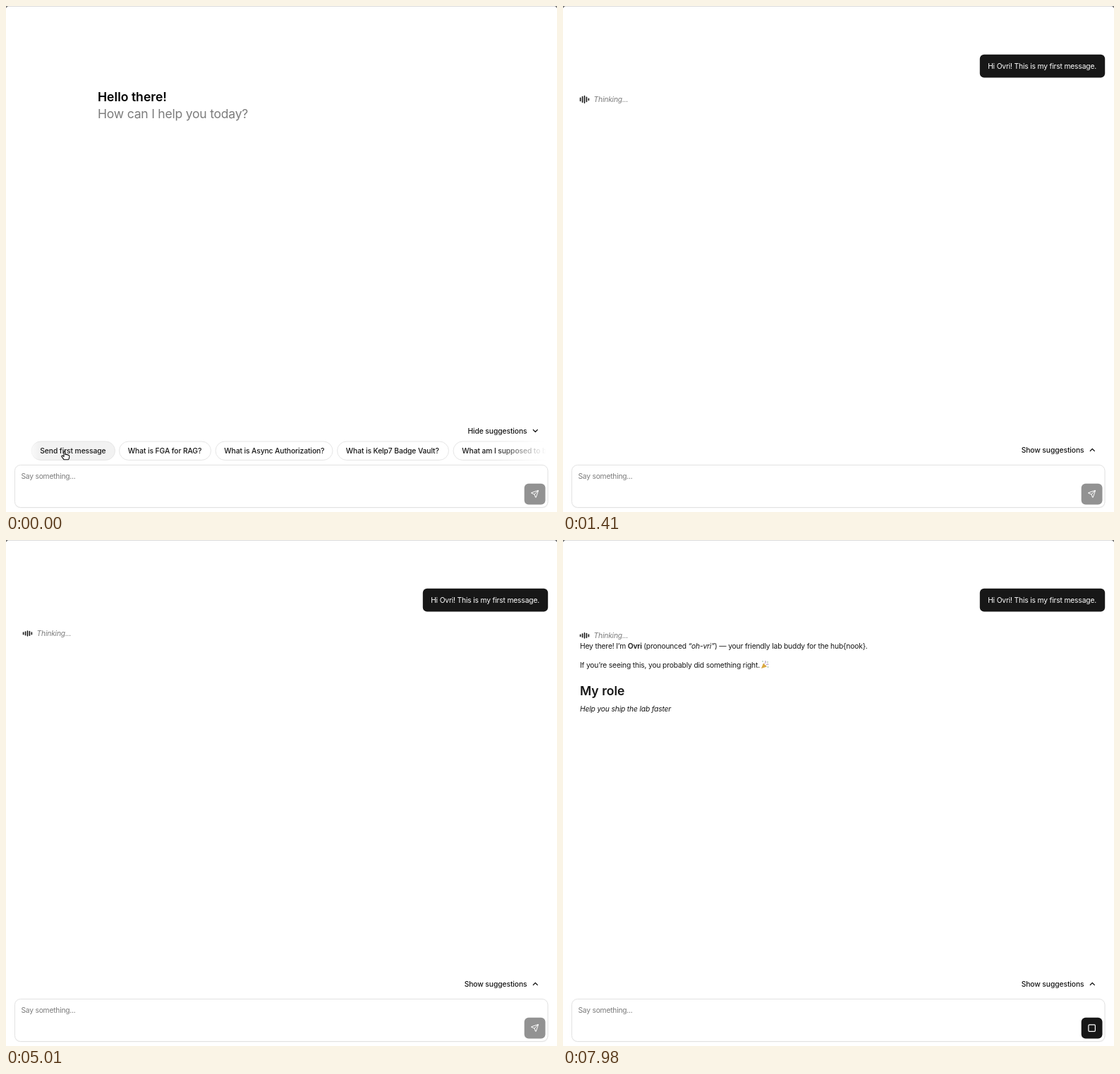
Write an HTML page that moves like this. It is 781 px wide and 717 px high and loops after 8 s.

```html
<!DOCTYPE html>
<html lang="en">
<head>
<meta charset="utf-8">
<title>Chat</title>
<style>
  html, body { margin: 0; width: 100%; height: 100%; overflow: hidden; background: #fff; }
  svg { display: block; }
  text { font: 10.3px Inter, sans-serif; letter-spacing: -.017em; fill: #171717; white-space: pre; }
  .medium { font-weight: 500; letter-spacing: -.009em; }
  .title { font-size: 17.6px; letter-spacing: 0; font-weight: 600; }
  .subtitle { font-size: 17.6px; letter-spacing: -.014em; }
  .muted { fill: #7c7c7c; }
  .italic { font-style: italic; }
  .bold { font-weight: 600; }
  .line { fill: none; stroke-linecap: round; stroke-linejoin: round; }
</style>
</head>
<body>
<svg width="781" height="717" viewBox="0 0 781 717">
  <defs>
    <linearGradient id="fade" gradientUnits="userSpaceOnUse" x1="28" x2="766">
      <stop offset="0" stop-color="#fff" stop-opacity="0"/>
      <stop offset=".025" stop-color="#fff"/>
      <stop offset=".9" stop-color="#fff"/>
      <stop offset="1" stop-color="#fff" stop-opacity="0"/>
    </linearGradient>
    <mask id="edges" maskUnits="userSpaceOnUse" x="0" y="600" width="781" height="44.5">
      <rect x="24" y="600" width="742" height="44.5" fill="url(#fade)"/>
    </mask>
  </defs>

  <path d="M0 .5H781" stroke="#dcdcdc"/>
  <path d="M0 0H3L0 3ZM781 0H778L781 3Z" fill="#777"/>

  <g id="welcome">
    <text class="title" x="130" y="134.5" style="fill:#000">Hello there!</text>
    <text class="subtitle muted" x="130" y="158.5">How can I help you today?</text>
  </g>

  <g id="chat">
    <rect x="590.8" y="68.8" width="177.4" height="32.6" rx="6" fill="#171717"/>
    <text x="756" y="88.8" text-anchor="end" style="fill:#fff">Hi Ovri! This is my first message.</text>
    <g id="thinking">
      <path id="bars" class="line" stroke="#171717" stroke-width="1.6"/>
      <text class="italic muted" x="43.5" y="136.2">Thinking...</text>
    </g>
    <g id="reply"></g>
    <g id="popper">
      <path d="M281 182L284 174.5L289 179.5Z" fill="#d9a93f"/>
      <path class="line" d="M286 175Q288 174 287 171.5M288 177Q289 175 291 176" stroke="#9b7bb0"/>
      <path class="line" d="M283 172h.1M290 173h.1M290.5 180h.1" stroke="#6f9a78" stroke-width="1.3"/>
    </g>
  </g>

  <g mask="url(#edges)"><g id="pills"></g></g>

  <g id="toggle">
    <text id="label" class="medium" x="738.5" y="605.7" text-anchor="end"></text>
    <path id="chevron" class="line" d="M-3 -1.5L0 1.5L3 -1.5" stroke="#171717" stroke-width="1.2"/>
  </g>

  <rect x="12.5" y="651.5" width="756" height="60" rx="8" fill="#000" opacity=".05"/>
  <rect x="12.5" y="650.5" width="755.5" height="60" rx="8" fill="#fff" stroke="#e2e2e2"/>
  <text class="muted" x="21.5" y="670.2" style="letter-spacing:-.023em">Say something...</text>
  <rect id="button" x="734.7" y="676.8" width="29.8" height="29.8" rx="6"/>
  <path id="send" class="line" stroke="#fff" stroke-width="2" transform="translate(743.5 685.5) scale(.5)"
    d="M14.5 21.7Q15.2 22.2 15.5 21.6L22 2.7Q22 1.9 21.3 2L2.3 8.5Q1.7 9 2.3 9.5L10.2 12.6Q11 13 11.4 13.8ZM21.8 2.2L10.9 13.1"/>
  <rect id="stop" class="line" x="744.9" y="686.9" width="9.5" height="9.5" rx="1.3" stroke="#fff" stroke-width="1.2"/>

  <path id="hand" class="line" style="fill:#fff" stroke="#111" stroke-width="1.1"
    d="M-2 7L-5 3Q-5.5 1 -3.5 1.5L-2 3V-4Q-1 -6 0 -4V0Q1 -1.2 2 .2Q3.2 -.6 4 .8Q5.7 .4 5.7 2V4Q5.5 6 4.5 7Z"/>
  <path id="arrow" d="M0 0V11L2.6 8.7L4.3 12.5L6.1 11.7L4.4 8H8Z" fill="#000" stroke="#fff" stroke-width=".8"/>
</svg>

<script>
const LOOP = 8000, SENT = 560, ANSWERING = 6510;
const $ = id => document.getElementById(id);
const show = (el, on) => el.setAttribute('visibility', on ? 'visible' : 'hidden');
const move = (el, x, y, extra = '') => el.setAttribute('transform', `translate(${x} ${y}) ${extra}`);
const easeOut = (t, start, length) => 1 - (1 - Math.min(1, Math.max(0, (t - start) / length))) ** 2;

function add(parent, tag, attrs, text = '') {
  const el = document.createElementNS('http://www.w3.org/2000/svg', tag);
  for (const name in attrs) el.setAttribute(name, attrs[name]);
  el.textContent = text;
  return parent.appendChild(el);
}

// Suggestion label, left edge, width
const pills = [
  ['Send first message', 36, 118.5],
  ['What is FGA for RAG?', 160.5, 130],
  ['What is Async Authorization?', 297, 166],
  ['What is Kelp7 Badge Vault?', 469.5, 158],
  ['What am I supposed to be doing?', 634, 186],
  ['Show me more', 827, 100],
].map(([label, x, width]) => {
  const group = add($('pills'), 'g', {});
  const box = add(group, 'rect', { x, y: 617, width, height: 26.5, rx: 13.25, stroke: '#e5e5e5' });
  add(group, 'text', { x: x + 12.3, y: 633.8, class: 'medium' }, label);
  return { group, box };
});

// Reply paragraphs: baseline, first word time, time per word, class, words
const words = [];
for (const [y, start, step, style, line] of [
  [154, 6705, 30, '', 'Hey |there! |I’m |*Ovri |(pronounced |_“oh-vri”|) — |your |friendly |lab |buddy |for |the |hub{nook}.'],
  [180.8, 7170, 42, '', 'If |you’re |seeing |this, |you |probably |did |something |right.'],
  [220.4, 7590, 42, 'title', 'My |role'],
  [243, 7680, 45, 'italic', 'Help |you |ship |the |lab |faster'],
]) {
  const text = add($('reply'), 'text', { x: 24, y, class: style });
  line.split('|').forEach((word, i) => {
    const kind = { '*': 'bold', _: 'italic' }[word[0]] || '';
    const el = add(text, 'tspan', { class: kind }, kind ? word.slice(1) : word);
    words.push({ el, time: start + i * step });
  });
}

function drawBars(t) {
  const path = [5, 9, 12, 9, 4.5].map((height, i) => {
    const wave = Math.cos(2 * Math.PI * (t / 1000 - .08 - .1 * (i - 2)));
    const half = (height * (.82 - .18 * wave) - 1) / 2;
    return `M${24.6 + i * 2.95} ${132.4 - half}v${2 * half}`;
  });
  $('bars').setAttribute('d', path.join(''));
}

function draw(t) {
  const sent = t >= SENT, answering = t >= ANSWERING;
  show($('welcome'), !sent);
  show($('chat'), sent);

  const folded = easeOut(t, SENT, 240), turned = easeOut(t, SENT, 200);
  move($('toggle'), 0, 27 * folded);
  $('label').textContent = sent ? 'Show suggestions' : 'Hide suggestions';
  move($('chevron'), 750.3, 602, `rotate(${-180 * turned})`);

  move($('pills'), sent ? -125 : 0, 27 * folded);
  $('pills').setAttribute('opacity', 1 - folded);
  pills.forEach(({ group, box }, i) => {
    show(group, folded < 1 && (i > 0 || !sent));
    box.setAttribute('fill', i === +sent ? '#f2f2f2' : '#fff');
  });

  drawBars(t);
  move($('thinking'), 0, answering ? 3 : 0);
  for (const { el, time } of words) show(el, sent && t >= time);
  show($('popper'), t >= 7548);

  $('button').setAttribute('fill', answering ? '#171717' : '#929292');
  show($('send'), !answering);
  show($('stop'), answering);

  show($('hand'), !sent);
  move($('hand'), 84, 635.7, `scale(${t < 360 ? 1 : .92})`);
  const away = easeOut(t, SENT, 200);
  show($('arrow'), sent && t < 840);
  move($('arrow'), 84 - 32 * away, 631 - 12 * away);
}

function frame() {
  draw(performance.now() % LOOP);
  requestAnimationFrame(frame);
}
frame();
</script>
</body>
</html>
```
